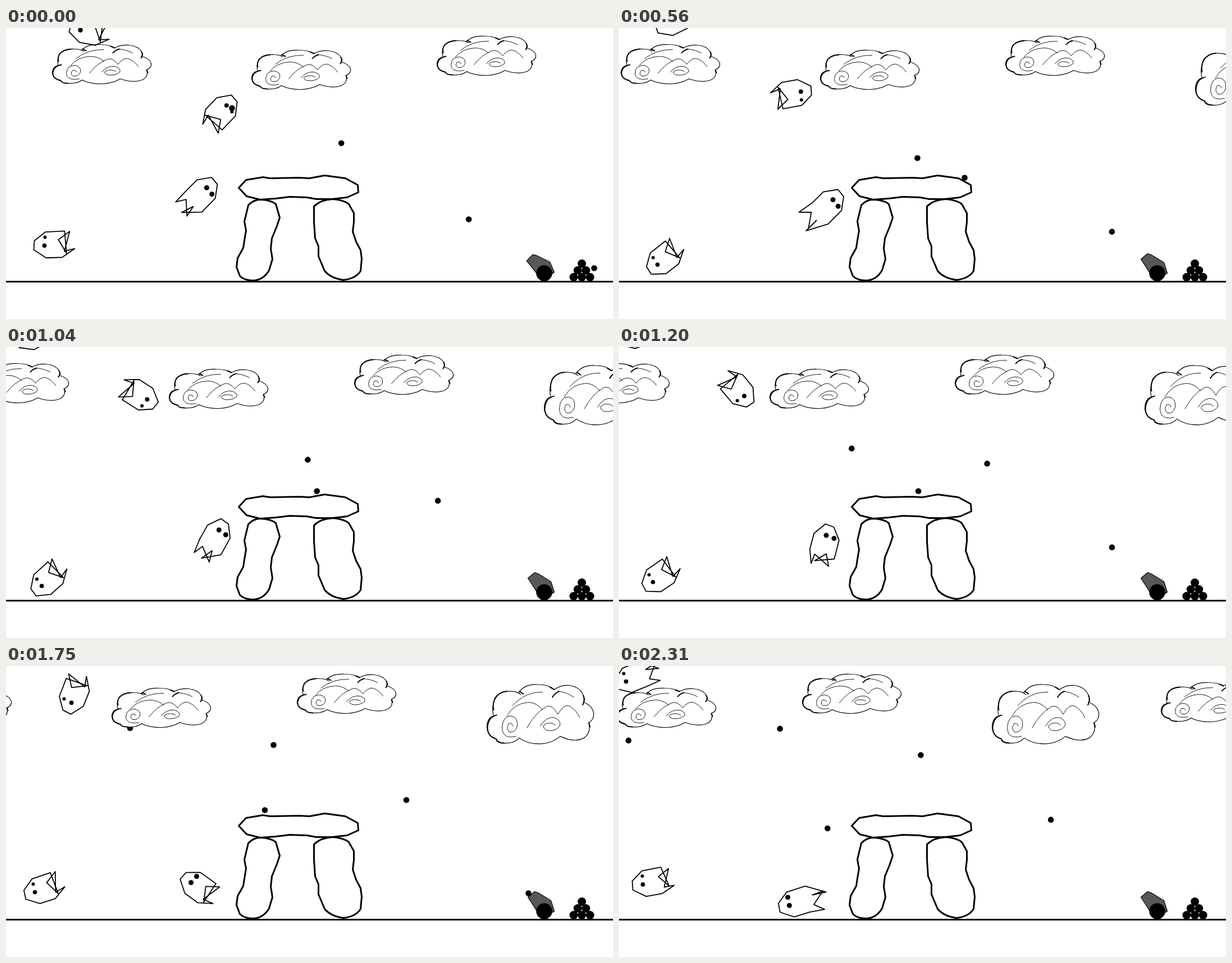
An HTML page with a canvas that plays this animation: 1081x518 px, repeating every 2.39 s.

```html
<!DOCTYPE html>
<html lang="en">
<head>
<meta charset="utf-8">
<title>Ghosts and cannon</title>
<style>
html, body { margin: 0; width: 100%; height: 100%; overflow: hidden; background: #fff; }
canvas { display: block; }
</style>
</head>
<body>
<canvas id="stage" width="1081" height="518"></canvas>
<script>
const ctx = document.getElementById('stage').getContext('2d');
const LOOP = 2390;

// Smooth curve through a few rows of [step, ...values].
function spline(keys, n) {
  const last = keys.length - 1;
  let i = 0;
  while (i < last - 1 && keys[i + 1][0] < n) i++;
  const a = keys[i], b = keys[i + 1];
  const span = b[0] - a[0];
  const s = Math.min(1, (n - a[0]) / span);
  const slope = (k, j) => {
    const p = keys[Math.max(0, k - 1)], q = keys[Math.min(last, k + 1)];
    return (q[j] - p[j]) / (q[0] - p[0]);
  };
  const ease = s * s * (3 - 2 * s);
  return a.map((v, j) => v + (b[j] - v) * ease
    + span * s * (1 - s) * ((1 - s) * slope(i, j) - s * slope(i + 1, j))).slice(1);
}
const mix = (a, b, k) => a + (b - a) * k;

function disc(x, y, r) {
  ctx.fillStyle = '#000';
  ctx.beginPath();
  ctx.arc(x, y, r, 0, 2 * Math.PI);
  ctx.fill();
}
function stroke(path, width) {
  ctx.lineWidth = width;
  ctx.stroke(path);
}

// ---- Stones ----
const stones = [
  'M414,284 L427,270 L457,265 L470,267 L522,266 L540,267 L567,262 L604,267 L626,279 L627,292 L607,301 L580,304 L552,304 L535,301 L505,300 L480,303 L452,305 L428,299Z',
  'M431,315 Q440,305 453,305 Q472,306 480,313 L487,337 L482,352 L473,374 L471,392 L474,411 L468,431 Q458,448 440,449 Q424,449 416,441 L410,425 L412,409 L422,391 L424,378 L427,360 L424,344Z',
  'M548,317 Q560,305 582,304 Q602,306 610,313 L619,329 L619,345 L617,362 L623,380 L631,395 L633,410 L631,432 Q622,446 600,448 Q578,445 567,432 L556,406 L556,388 L550,374 L548,345Z'
].map(d => new Path2D(d));

// ---- Clouds ----
const cloudParts = [
  'M15,65 Q2,62 0,52 Q0,40 11,38 Q7,30 13,17 Q22,8 40,9 Q50,9 56,13 Q50,10 54,9 Q64,0 84,1 Q102,1 111,7 Q122,1 136,2 Q154,4 159,14 Q162,18 160,22 Q174,26 176,35 Q177,42 168,46 Q172,58 160,64 Q144,70 121,62 Q108,70 88,71 Q66,71 53,64 Q44,71 28,70 Q16,70 15,65Z',
  'M16,37 Q7,39 4,43 Q-1,50 2,57 Q5,63 15,65 Q17,70 28,70 M11,31 Q9,24 13,18 Q19,10 33,9 M54,9 L60,12 M108,16 Q112,11 119,9 M104,4 L111,7 M159,14 Q162,19 158,25 M168,46 L170,51',
  'M48,62 Q26,66 25,52 Q26,38 40,38 Q52,40 50,50 Q47,58 37,57 Q31,53 36,47 Q42,46 43,50 M88,50 Q98,38 112,40 Q123,44 120,50 Q112,57 98,55 Q88,50 98,47 Q108,45 113,49 M33,38 Q45,23 68,22 Q82,22 92,31 M66,52 Q80,34 98,27 Q108,24 117,36 M42,26 Q64,9 92,10 M117,36 Q128,22 138,27 Q148,32 153,40 M118,9 Q132,10 143,16'
].map(d => new Path2D(d));
function scaledCloud(sx, sy) {
  return cloudParts.map(part => {
    const path = new Path2D();
    path.addPath(part, new DOMMatrix([sx, 0, 0, sy, 0, 0]));
    return path;
  });
}
const small = scaledCloud(1, 1), big = scaledCloud(1.08, 1.51);
const clouds = [[82, 28, small], [437, 38, small], [767, 13, small], [1105, 31, big], [1406, 28, small]];
const drift = n => 11.3 * n + 16.2 * Math.max(0, n - 22);

function drawCloud(x, y, [outline, accent, inner]) {
  ctx.save();
  ctx.translate(Math.round(x), y);
  ctx.fillStyle = '#fff';
  ctx.fill(outline);
  stroke(outline, 1.2);
  stroke(accent, 2);
  stroke(inner, 0.9);
  ctx.restore();
}

// ---- Cannon balls ----
// A shot leaves the cannon every four steps; p counts shots flown.
function shot(launch, climb, to = launch + 17, from = Math.max(0, launch)) {
  return { from, to, place(n) {
    const p = (n - launch) / 4;
    return [930 - 208 * p - 9.5 * p * p, 404 - climb * p + 34 * p * p];
  } };
}
const balls = [
  shot(-6, 184, 4), shot(-2, 145, 3.3), shot(2, 154, 7), shot(6, 176),
  ...[10, 14, 18, 22, 26].map(launch => shot(launch, 200)),
  // striking the first ghost
  { from: 0, to: 1, place: () => [402, 142] },
  // bouncing off the lintel
  { from: 3.3, to: 13, place: n => [531 - 25.4 * (n - 7), 231 - (n - 7) + 2.1 * (n - 7) ** 2] },
  // rolling along the lintel, then falling off its end
  { from: 7, to: 30, place(n) {
    const fall = Math.max(0, n - 24) ** 2;
    return [615 - 10.3 * (n - 7) - 0.7 * fall, 256 + 10 * Math.exp(7 - n) + 1.3 * fall];
  } },
  // bouncing away past the pile
  { from: 0, to: 2, place: n => [1047 + 21 * n, 427 + 9 * n] }
];
function drawBalls(n) {
  for (const { from, to, place } of balls)
    if (n >= from && n < to) disc(...place(n), 5.3);
}

// ---- Ghosts ----
// A stiff head and a cloth tail that blends between folded and spread.
const head = [[33, 26], [4.5, 29], [-18.5, 16], [-18.5, 0], [0, -17], [34, -21]];
const folded = [[40, 18], [24, -5], [43, -21], [36, 15], [54, 9]];
const spread = [[72, -6], [46, -3], [66, -5], [44, 14], [61, 28]];

// Poses: [step, x, y, angle, spread of the tail]
const ghosts = [
  { eyes: [3.5, 4.3], poses: [
    [0, 134, -4, 16, 0], [7, 81, -13, -20, 0], [10, 60, -16, -29, 0], [18, -10, -30, -5, 0]] },
  { eyes: [3, 3.9], poses: [
    [0, 397, 143, 140, 0], [10, 288, 109.5, 195, 0], [22, 109.5, 61.5, 298, 0], [29, 10, 20, 344, 0.7]] },
  { eyes: [4.5, 4.5], poses: [
    [0, 361.5, 289.5, 141, 0.7], [10, 391, 320.5, 138, 1], [15, 375.5, 337.5, 111, 0.3],
    [22, 334, 379.5, 42, 0], [26, 312.5, 409.5, 4, 0.7], [29, 301.5, 418.5, -11, 0.9]] },
  { eyes: [3, 3.8], poses: [
    [0, 68.5, 379.5, 4, 0], [10, 62, 424.5, -42, 0], [15, 56.5, 411.5, -28, 0],
    [22, 49.5, 395, -12, 0], [29, 41.5, 381, -4, 0.2]] }
];
function drawGhost({ eyes, poses }, n) {
  const [x, y, angle, open] = spline(poses, n);
  const c = Math.cos(angle * Math.PI / 180), s = Math.sin(angle * Math.PI / 180);
  const place = ([u, v]) => [x + u * c - v * s, y + u * s + v * c];
  const tail = folded.map(([u, v], i) => [mix(u, spread[i][0], open), mix(v, spread[i][1], open)]);
  const outline = new Path2D();
  [...head, ...tail].forEach(point => outline.lineTo(...place(point)));
  outline.closePath();
  stroke(outline, 1.8);
  disc(...place([0, -7.4]), eyes[0]);
  disc(...place([0, 7.4]), eyes[1]);
}

// ---- Cannon and pile ----
const barrel = new Path2D('M-29,-25 L-17,-35 L-11,-33 L12,-19 L18,0 L8,6 L-13,0Z');
function drawCannon(n) {
  ctx.save();
  ctx.translate(958, 436);
  ctx.rotate(-0.096 * Math.max(0, 1 - n / 6));
  ctx.fillStyle = '#585858';
  ctx.fill(barrel);
  stroke(barrel, 1.2);
  ctx.fillStyle = '#d8c8a8';
  ctx.fillRect(8, -25, 2, 4);
  ctx.restore();
  disc(958, 436, 14.3);
  for (let row = 0; row < 3; row++)
    for (let i = 0; i <= row; i++) disc(1025 + (i - row / 2) * 14.6, 419 + row * 12, 7.5);
}

function draw(n) {
  ctx.fillStyle = '#fff';
  ctx.fillRect(0, 0, 1081, 518);
  ctx.fillStyle = '#000';
  ctx.fillRect(0, 450, 1081, 3);
  ctx.strokeStyle = '#000';
  ctx.lineJoin = ctx.lineCap = 'round';
  ctx.save();
  ctx.translate(0.5, 0.5);
  stones.forEach(stone => stroke(stone, 3));
  drawCannon(n);
  drawBalls(n);
  clouds.forEach(([x, y, shape]) => drawCloud(x - drift(n), y, shape));
  ghosts.forEach(ghost => drawGhost(ghost, n));
  ctx.restore();
}

const start = performance.now();
function tick() {
  const t = Math.max(0, performance.now() - start) % LOOP;
  // Steps last 80 ms, except one of 70 ms at 1200.
  draw(Math.floor((t < 1200 ? t : t + 10) / 80));
  requestAnimationFrame(tick);
}
tick();
</script>
</body>
</html>
```
